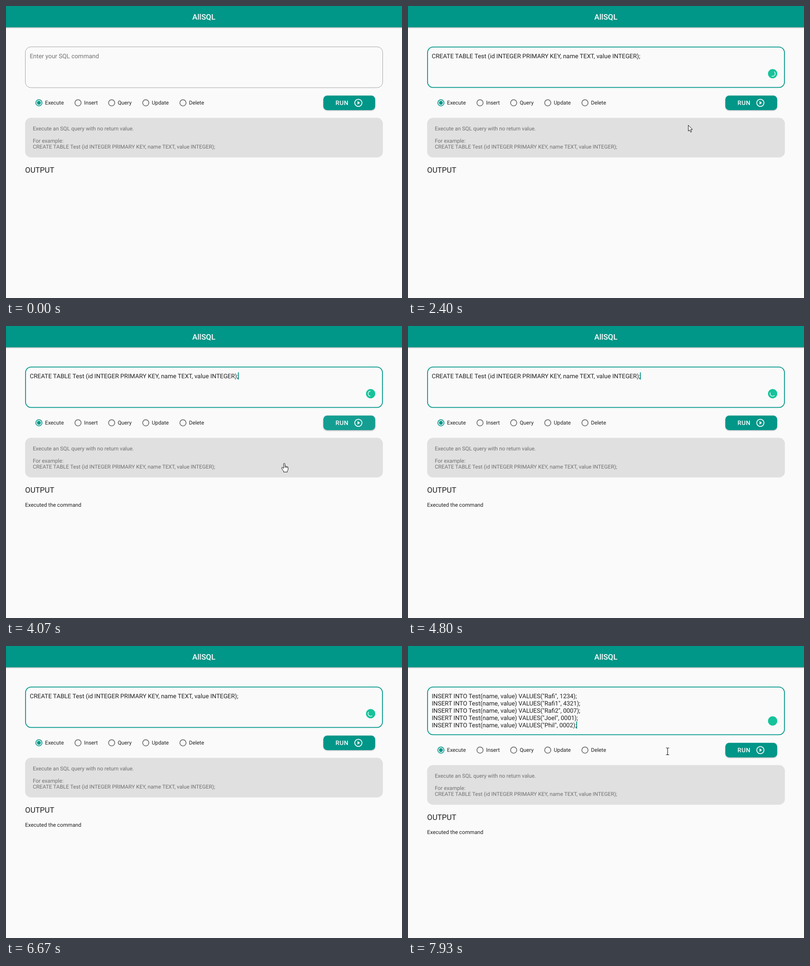
These frames come from a looping animation (871x643 px, 8000 ms). An HTML page:

```html
<!DOCTYPE html>
<html lang="en">
<head>
<meta charset="utf-8">
<title>AllSQL</title>
<style>
html, body { margin: 0; width: 100%; height: 100%; overflow: hidden; background: #fafafa; }
svg { display: block; font-family: Roboto, sans-serif; text-rendering: geometricPrecision; }
text { fill: #212121; white-space: pre; }
.title { font-size: 16.84px; font-weight: 500; fill: #fff; text-anchor: middle; }
.field { font-size: 13.47px; }
.small { font-size: 11.79px; }
.head { font-size: 16.84px; }
.run { font-size: 13.47px; font-weight: 500; fill: #fff; letter-spacing: .6px; }
.note text { fill: #707070; }
.bar { fill: #009688; filter: drop-shadow(0 1.5px 1.7px rgba(0,0,0,.3)); }
#btn { fill: #009688; filter: drop-shadow(0 1px 1px rgba(0,0,0,.3)); }
#btn.hover { fill: #149e92; filter: drop-shadow(0 1.5px 1.8px rgba(0,0,0,.35)); }
#frame { fill: none; stroke: #9b9b9b; stroke-width: .9; }
#frame.focus { stroke: #009688; stroke-width: 1.8; }
</style>
</head>
<body>
<svg width="871" height="643" viewBox="0 0 871 643">
  <rect class="bar" x="-10" y="-10" width="891" height="57"/>
  <text class="title" x="435.2" y="30">AllSQL</text>

  <rect id="frame" rx="12.2"/>
  <rect id="mark" x="52.2" y="102" height="16" fill="#009688" fill-opacity=".4"/>
  <g id="lines"></g>
  <rect id="caret" width="1.7" height="16" fill="#009688"/>

  <g id="below">
    <g id="radios"></g>
    <rect id="btn" x="698" y="197.2" width="114" height="32" rx="8.4"/>
    <text class="run" x="724.8" y="218">RUN</text>
    <g transform="translate(775 213.2) scale(.88)">
      <circle r="9" fill="none" stroke="#fff" stroke-width="2"/>
      <path d="M-2-4.5L4 0-2 4.5z" fill="#fff"/>
    </g>
    <g class="note">
      <rect x="42.1" y="246.3" width="786.8" height="87.2" rx="12.6" fill="#e0e0e0"/>
      <text class="small" x="58.9" y="273.8">Execute an SQL query with no return value.</text>
      <text class="small" x="58.9" y="300.8">For example:</text>
      <text class="small" x="58.9" y="314.3">CREATE TABLE Test (id INTEGER PRIMARY KEY, name TEXT, value INTEGER);</text>
    </g>
    <text class="head" x="42.1" y="366.6">OUTPUT</text>
    <text class="small" id="result" x="42.1" y="397.7">Executed the command</text>
    <g id="badge" transform="translate(802 149)">
      <circle r="10.3" fill="#15c39a"/>
      <circle id="spin" r="5.6" fill="none" stroke="#fff" stroke-width="1.4" stroke-dasharray="15.6 40"/>
    </g>
  </g>

  <g id="pointer">
    <path id="arrow" d="M.5.5V13.5L3.5 10.8 5.6 15.8 7.8 14.9 5.7 10H9.8z" fill="#fff" stroke="#111" stroke-linejoin="round"/>
    <path id="hand" d="M-1.5 1.2Q0-.6 1.5 1.2V6.8Q3.3 5.8 4 7.4 5.6 6.6 6.3 8.1 8.3 7.6 8.5 9.6V13Q8.4 15.6 6.8 17.4V19.6H-1.4V17.6Q-3.4 15.4-5.6 11.6-6.2 9.2-4 9.4L-1.5 11.6zM1.5 6.8V10.2M4 7.4V10.4M6.3 8.1V10.6" fill="#fff" stroke="#111" stroke-linejoin="round"/>
    <path id="beam" d="M-3.5-7.5H-1.2Q0-7.4 0-6.2 0-7.4 1.2-7.5H3.5M0-6.5V6.5M-3.5 7.5H-1.2Q0 7.4 0 6.2 0 7.4 1.2 7.5H3.5" fill="none" stroke="#111" stroke-width="1.1"/>
  </g>
</svg>
<script>
const LOOP = 8000, STEP = 1000 / 15, LEFT = 52.2;
const $ = id => document.getElementById(id);
const set = (el, attrs) => { for (const k in attrs) el.setAttribute(k, attrs[k]); };
const show = (el, on) => { el.style.display = on ? "" : "none"; };
const make = (parent, tag, attrs, text = "") => {
  const el = document.createElementNS("http://www.w3.org/2000/svg", tag);
  set(el, attrs);
  el.textContent = text;
  return parent.appendChild(el);
};

const hint = ["Enter your SQL command"];
const create = ["CREATE TABLE Test (id INTEGER PRIMARY KEY, name TEXT, value INTEGER);"];
const rows = [["Rafi", "1234"], ["Rafi1", "4321"], ["Rafi2", "0007"], ["Joel", "0001"], ["Phil", "0002"]];
const insert = rows.map(([n, v]) => `INSERT INTO Test(name, value) VALUES("${n}", ${v});`);

const at = { caret: 1590, focus: 1790, paste: 1925, hover: 2590, done: 3660, leave: 4320, mark: 7520, still: 7720, insert: 7925 };

// time, x, y, shape; a null shape hides the pointer
const path = [
  [60, 238, 259, "arrow"], [190, 165, 226, "beam"], [470, 37, 186, "beam"], [860, 114, 214, "beam"],
  [1000, 115.5, 215, "beam"], [2000, 115.5, 215, "beam"], [2330, 592, 256, "arrow"], [2400, 616, 262, "arrow"],
  [2590, 617, 284, "hand"], [2860, 612, 294, "hand"], [3600, 612, 300.5, "hand"], [4070, 612, 302, "hand"],
  [4320, 613, 318, "arrow"], [4400, 613, 322, "arrow"], [4460, 613, 322, null],
  [6920, 574, 167, "beam"], [7200, 572, 167, "beam"], [7660, 571, 232, "beam"], [LOOP, 571, 232, "beam"]
];
const turns = [[1930, -220], [2400, 30], [3600, 675], [4070, 900], [5600, 1530], [6670, 1935], [7730, 2340]];

const ease = p => p * p * (3 - 2 * p);
function sample(table, t, curve) {
  let i = 0;
  while (i < table.length - 2 && t >= table[i + 1][0]) i++;
  const a = table[i], b = table[i + 1];
  const p = curve(Math.min(1, Math.max(0, (t - a[0]) / (b[0] - a[0]))));
  return a.map((v, k) => typeof v === "number" ? v + (b[k] - v) * p : v);
}

["Execute", "Insert", "Query", "Update", "Delete"].forEach((name, i) => {
  const cx = [72.4, 158.4, 232.4, 307.4, 389.2][i], g = $("radios");
  const color = i ? "#6f6f6f" : "#009688";
  make(g, "circle", { cx, cy: 213.2, r: 6.8, fill: "none", stroke: color, "stroke-width": 1.7 });
  if (!i) make(g, "circle", { cx, cy: 213.2, r: 4.2, fill: color });
  make(g, "text", { x: cx + 13.3, y: 217.4, class: "small" }, name);
});

let shown, width = 0;
function write(lines) {
  if (lines === shown) return;
  shown = lines;
  $("lines").textContent = "";
  lines.forEach((s, i) => {
    const el = make($("lines"), "text", { x: LEFT, y: 115 + 16 * i, class: "field" }, s);
    if (lines === hint) el.style.fill = "#737373";
    width = el.getComputedTextLength();
  });
}

function draw(time) {
  const t = Math.floor((time + 4) / STEP) * STEP;
  const focus = t >= at.focus, typed = t >= at.paste, grown = t >= at.insert;
  const extra = grown ? 16 : 0;

  write(grown ? insert : typed ? create : hint);
  $("frame").setAttribute("class", focus ? "focus" : "");
  const d = focus ? .5 : 0;
  set($("frame"), { x: 42.5 + d, y: 89.9 + d, width: 786 - 2 * d, height: 90 - 2 * d + extra });
  set($("below"), { transform: `translate(0 ${extra})` });

  const marked = t >= at.mark && !grown;
  show($("mark"), marked);
  $("mark").setAttribute("width", width);
  const lit = (t + 200) % 1000 < 499 || t < at.focus;
  show($("caret"), t >= at.caret && lit && !marked);
  set($("caret"), { x: typed ? LEFT + width - .6 : LEFT, y: 102 + 16 * (shown.length - 1) });

  $("btn").setAttribute("class", t >= at.hover && t < at.leave ? "hover" : "");
  show($("result"), t >= at.done);

  show($("badge"), typed);
  show($("spin"), t < at.still);
  $("spin").setAttribute("transform", `rotate(${sample(turns, t, p => p)[1] - 80})`);

  const [, x, y, shape] = sample(path, t, ease);
  const seen = t >= path[0][0] && shape;
  for (const id of ["arrow", "hand", "beam"]) show($(id), seen && id === shape);
  $("pointer").setAttribute("transform", `translate(${x.toFixed(1)} ${y.toFixed(1)})`);
}

const start = performance.now();
function tick() {
  draw((performance.now() - start) % LOOP);
  requestAnimationFrame(tick);
}
tick();
</script>
</body>
</html>
```
